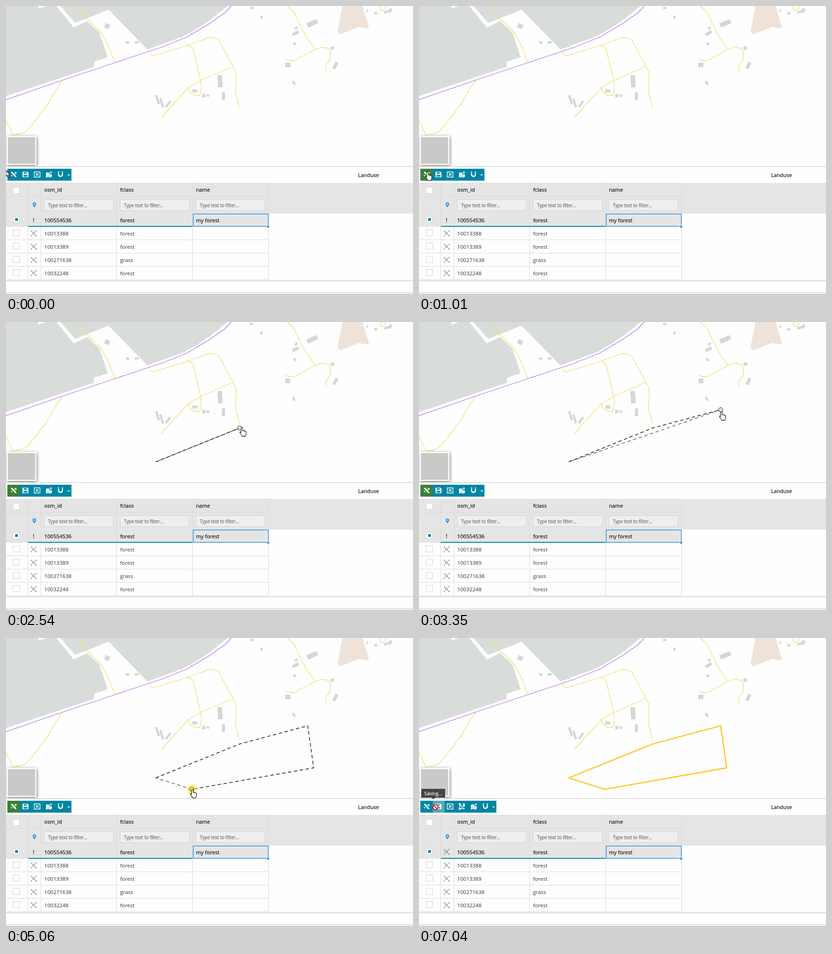
An HTML page for the animation above (8000 ms loop, 889 by 630 pixels).

```html
<!DOCTYPE html>
<html lang="en">
<head>
<meta charset="utf-8">
<title>Add a shape</title>
<style>
  html, body { margin: 0; width: 100%; height: 100%; overflow: hidden; background: #fefefe; }
  svg { display: block; width: 889px; height: 630px; }
  text { font: 11.6px "Open Sans", "Noto Sans", sans-serif; fill: #333; }
  .medium { fill: #222; stroke: #222; stroke-width: .3; }
  .filter { font-size: 9.9px; fill: #777; stroke: #777; stroke-width: .3; }
  .tip text { font-size: 10.2px; fill: #fff; stroke: #fff; stroke-width: .2; text-anchor: middle; }
  .tip { fill: #444; }
  .road { fill: none; stroke: #ecdf70; stroke-width: 1.3; }
  .houses { fill: none; stroke: #d5d7d7; }
  .line { fill: none; stroke: #fff; stroke-width: 1.5; }
  .pointer { fill: #fff; stroke: #000; stroke-width: 1.1; stroke-linejoin: round; }
</style>
</head>
<body>
<svg viewBox="0 0 889 630">
  <defs>
    <filter id="shadow" x="-30%" y="-30%" width="160%" height="160%">
      <feDropShadow dx="1" dy="2" stdDeviation="3.5" flood-opacity=".6"/>
    </filter>
    <g id="zoom" fill="none" stroke="#555">
      <path d="M-5.5-3.5v-2h2M3.500-5.500h2v2M5.500 3.500v2h-2M-3.500 5.500h-2v-2M1 1L4 4"/>
      <circle cx="-.7" cy="-.7" r="2.300"/>
    </g>
  </defs>

  <!-- map -->
  <g fill="#d8ddd9">
    <path d="M0 0H70L71 6 87 0H110L148 47 177 33 204 58 222 112 192 122V133L0 197z"/>
    <path d="M119 0L151 37 224 8 309 95 386 67 420 48 449 28 484 0z"/>
  </g>
  <path fill="#efe3d9" d="M735 0H779L793 47 790 49 771 46 730 62 724 56z"/>
  <g class="houses">
    <path stroke-width="5" d="M328 195l6 20M337 202l6 20M349 221l10-13M626 164l5 8M262 79l7 2M281 80l9-1M533 4.500h7M558 21v6M631 50l6-4M628 80l5 5M787 10h4M804 16h7M826 15l9-4M438 196h6"/>
    <path stroke-width="7" d="M407 186h11M432 192v8M475 189v17M626 63l13-7M709 93l8-2M716 137l7-14M836 14l6-8"/>
    <path stroke-width="10" d="M216 41.500l10 5M467 151v13M468 164v14M610 129h11M658 43l22-10"/>
  </g>
  <g class="road">
    <path d="M156 0L176 27 207 57 223 86 238 124M124 162L109 183 92 214 67 247 44 275 30 280 15 282 0 250"/>
    <path d="M313 99L316 107 322 109 396 86 447 68 464 73 496 132 502 144 503 165 501 188 510 222"/>
    <path d="M396 86L404 88 409 95 425 163 427 179 423 196 410 195 401 188 399 178"/>
    <path d="M496 132L425 163 399 178 354 227 340 244M614 0L628 12 653 63 675 95"/>
    <path d="M610 115L617 119 629 120 675 95 691 90 705 93 709 101 708 118 699 128 698 135 701 143"/>
    <circle cx="823" cy="4" r="6"/>
  </g>
  <path fill="none" stroke="#b06ef0" stroke-width="1.300" d="M0 205L124 162 238 124 313 99 340 90 395 68 445 38 478 15 492 0"/>
  <rect x="3" y="285.500" width="62" height="61" fill="#c9c9c7" stroke="#fff" stroke-width="2.500" filter="url(#shadow)"/>
  <path id="finished" fill="none" stroke="#ffc931" stroke-width="2.800" stroke-linejoin="round"/>
  <g id="sketch" fill="none" stroke-width="1.700" stroke-dasharray="7.6 5.4">
    <path id="closing" stroke="#777"/>
    <path id="edges" stroke="#333"/>
  </g>

  <!-- table -->
  <path fill="#fefefe" d="M0 351H889V630H0z"/>
  <path stroke="#d6d6d6" stroke-width="1.500" d="M0 351H889"/>
  <path fill="#e5e5e5" d="M0 387H889V454H573V483H0z"/>
  <path fill="none" stroke="#d9d9d9" d="M0 387.500H573M0 416.500H573M47.500 387V600M76.500 387V600M241.500 387V600M407.500 387V600M573.500 387V600"/>
  <g id="cells"></g>
  <path fill="#3d9ad6" d="M62 441C60 437 58 436 58 433.500a4 4 0 0 1 8 0C66 436 64 437 62 441z"/>
  <circle cx="62" cy="433.500" r="1.400" fill="#e5e5e5"/>
  <path stroke="#0086a3" stroke-width="2" d="M48 482H407"/>
  <rect x="409" y="455" width="164" height="27" fill="none" stroke="#5aa7e3" stroke-width="2"/>
  <rect x="569.500" y="479.500" width="6" height="6" fill="#4a9fe0" stroke="#fff"/>
  <rect x="20" y="464" width="6" height="6" fill="#0086a3"/>
  <text id="unsaved" x="58.500" y="473" style="font-size:13px;font-weight:600">!</text>
  <use id="saved" href="#zoom" x="60.500" y="468"/>
  <path stroke="#cfcfcf" stroke-width="1.500" d="M0 601H889M0 627.500H889"/>

  <!-- toolbar -->
  <text x="769" y="373.500" class="medium">Landuse</text>
  <rect id="bar" x="3" y="356" height="26" fill="#0086a3"/>
  <rect id="addButton" x="3" y="356" width="27" height="26"/>
  <rect id="saveButton" x="30" y="356" width="26" height="26"/>
  <g fill="#fff">
    <g transform="translate(17 368.500)">
      <path d="M-6.500-4.500L-4-6.500 4.500 2.500 6 6.500 2 5z"/>
      <path class="line" d="M4-6v5.500M1.200-3.200h5.600M-6 1l2.500 3"/>
    </g>
    <path transform="translate(42.500 368.500)" fill-rule="evenodd" d="M-6.500-6H4.500L6.500-4V6H-6.500zM-3.500-4.800V-1.500H3V-4.800zM-4.300 1V4.700H4.300V1z"/>
    <path class="line" transform="translate(68 368.500)" d="M-6.300-5.800H6.300V5.800H-6.300zM-3-3L3 3M3-3L-3 3"/>
    <g id="reshape" transform="translate(94 368.500)">
      <path class="line" d="M-5-5V5H6M-5-5L3 5"/>
      <path d="M-7-7h4v4h-4zM-7 3h4v4h-4zM1-5h1.200v-1.500h1.300V-7h1.300v1h1.400v5l-2 2.500H3L1-2z"/>
    </g>
    <g id="tail">
      <path transform="translate(94 369)" d="M-6.500-4L-2.500-5.500V5L-6.500 6.500zM-1.800-5.500L1.500-3V6.500L-1.800 5zM2.200-2L4 0 6-2V5L2.200 6.500zM1.500-6.500h5L4-2z"/>
      <path class="line" style="stroke-width:2.600" transform="translate(119 368)" d="M-4.200-6V.5a4.200 4.200 0 0 0 8.400 0V-6"/>
      <path stroke="#0086a3" d="M113 365h12"/>
      <path d="M134 368.500h6l-3 3z"/>
    </g>
  </g>

  <!-- tooltips and pointers -->
  <g class="tip" id="addTip">
    <path d="M0 316H163V349H21L17 353 13 349H0z"/>
    <text x="80" y="330">Add a shape to the existing</text>
    <text x="80" y="344">geometry</text>
  </g>
  <g class="tip" id="saveTip">
    <path d="M5 330H81V349H47L43 353 39 349H5z"/>
    <text x="43" y="343.500">Save changes</text>
  </g>
  <g class="tip" id="savingTip">
    <path d="M5 330H57V349H35L31 353 27 349H5z"/>
    <text x="31" y="343.500">Saving...</text>
  </g>
  <circle id="halo" r="10" fill="#fff029" fill-opacity=".8"/>
  <circle id="vertex" r="4.500" fill="#fff" fill-opacity=".5" stroke="#333" stroke-width="1.200"/>
  <g id="pointer">
    <path id="arrow" class="pointer" d="M0 0V13L3 10.200 5 15 7.300 14 5.300 9.300H9.300z"/>
    <path id="hand" class="pointer" transform="translate(1 0)" d="M-1.700 11V1.200a1.700 1.700 0 0 1 3.400 0V7a1.600 1.600 0 0 1 2.800.6 1.600 1.600 0 0 1 2.500.6 1.500 1.500 0 0 1 2.300 1.200V13c0 2.500-1.700 3.500-1.700 6H.4C.2 16.500-3 14-4.200 11.200c-.5-1.700 1-2.400 2.500-.2z"/>
    <path id="resize" d="M-6-1H7V.5H-6zM-6 2.500H7V4H-6zM0-1V-3H-2.500L.5-6.500 3.500-3H1V-1zM0 4V6H-2.500L.5 9.500 3.500 6H1V4z"/>
    <g id="blocked" fill="#fff" stroke="#c4161c" stroke-width="2"><circle r="5.500"/><path d="M-4-4L4 4"/></g>
  </g>
</svg>

<script>
const LOOP = 8000, STEP = 70, LAG = 45;
const HOVER_ADD = 203, ADD_MODE = 600, LEAVE_ADD = 1010, FINISH = 5310, HOVER_SAVE = 6390, SAVING = 7040;
const TEAL = '#0086a3', DARK_TEAL = '#003d4b';
const $ = id => document.getElementById(id);
const show = (id, on) => { $(id).style.display = on ? '' : 'none'; };
const place = (id, [x, y]) => $(id).setAttribute('transform', `translate(${x} ${y})`);
const outline = points => 'M' + points.join('L');

const label = (x, y, text, type = '') => `<text x="${x}" y="${y}" class="${type}">${text}</text>`;
const box = (x, y, w, h, fill) => `<rect x="${x}" y="${y}" width="${w}" height="${h}" fill="${fill}" stroke="#d2d2d2"/>`;
const columnX = i => 83.5 + 165.7 * i;

function tableCells() {
  const rows = ['100554536 forest', '10013388 forest', '10013389 forest', '100271638 grass', '10032248 forest'];
  let svg = box(15.5, 396.5, 14, 13.5, '#fff') + label(columnX(2), 472.5, 'my forest', 'medium');
  ['osm_id', 'fclass', 'name'].forEach((name, i) => {
    const x = columnX(i);
    svg += label(x, 406, name, 'medium') + box(Math.floor(x) + .5, 423.5, 151, 24, '#efefef')
      + label(x + 8.5, 440, 'Type text to filter...', 'filter');
  });
  rows.forEach((row, r) => {
    const y = 468 + 29 * r;
    svg += box(15.5, y - 7.5, 14, 13.5, '#fff');
    if (r) svg += `<use href="#zoom" x="60.5" y="${y + .5}"/><path stroke="#d9d9d9" d="M0 ${y + 14.5}H573"/>`;
    row.split(' ').forEach((text, i) => { svg += label(columnX(i), y + 4.5, text, r ? '' : 'medium'); });
  });
  return svg;
}
$('cells').innerHTML = tableCells();

// Corners of the drawn shape, in the order they are clicked
const shape = [[327, 306], [510, 232], [659, 192], [672, 284], [406, 331]];
$('finished').setAttribute('d', outline(shape) + 'z');

const moves = [
  { start: 70, end: 270, to: [17, 363] },
  { start: 930, end: 1410, to: shape[0] },
  { start: 1610, end: 2140, to: shape[1], corner: shape[0] },
  { start: 2410, end: 3090, to: shape[2], corner: shape[1] },
  { start: 3230, end: 3700, to: shape[3], corner: shape[2] },
  { start: 3900, end: 4650, to: [424, 326], corner: shape[3], bow: 9 },
  { start: 4710, end: 4920, to: shape[4] },
  { start: 5990, end: 6180, to: [127, 352] },
  { start: 6180, end: HOVER_SAVE, to: [36, 370] }
];
const cornerMoves = moves.filter(move => move.corner);
const clicks = [460, 5060, 5225, 6910, ...cornerMoves.map(move => move.start)];

function pointerAt(t) {
  let [x, y] = [0, 360];
  for (const { start, end, to, bow = 0 } of moves) {
    const p = Math.max(0, Math.min(1, (t - start - STEP) / (end - start - STEP)));
    const ease = p * p * (3 - 2 * p);
    x += (to[0] - x) * ease;
    y += (to[1] - y) * ease + bow * 4 * ease * (1 - ease);
  }
  return [x, y];
}

function draw(t) {
  const pointer = pointerAt(t), vertex = pointerAt(t - LAG);
  const adding = t >= ADD_MODE && t < FINISH, finished = t >= FINISH;
  const hoverAdd = t >= HOVER_ADD && t < LEAVE_ADD;
  const hoverSave = t >= HOVER_SAVE && t < SAVING, saving = t >= SAVING;

  const placed = cornerMoves.filter(move => t >= move.start).map(move => move.corner);
  show('sketch', adding && placed.length);
  show('closing', placed.length > 1);
  if (placed.length) {
    $('edges').setAttribute('d', outline([...placed, vertex]));
    $('closing').setAttribute('d', outline([vertex, placed[0]]));
  }
  show('vertex', adding && vertex[1] < 345);
  place('vertex', vertex);

  show('unsaved', !finished);
  for (const id of ['finished', 'saved', 'reshape']) show(id, finished);
  place('tail', [finished ? 26 : 0, 0]);
  $('bar').setAttribute('width', finished ? 166 : 140);
  $('addButton').setAttribute('fill', adding ? '#3b8039' : hoverAdd ? DARK_TEAL : TEAL);
  $('saveButton').setAttribute('fill', saving ? '#55aabd' : hoverSave ? DARK_TEAL : TEAL);

  show('addTip', hoverAdd);
  show('saveTip', hoverSave);
  show('savingTip', saving);
  show('halo', clicks.some(time => t >= time && t < time + STEP));
  place('halo', pointer);
  place('pointer', pointer);
  const onDivider = t >= 6180 && t < 6250;
  const cursor = t < HOVER_ADD ? 'arrow' : saving ? 'blocked' : onDivider ? 'resize' : 'hand';
  for (const id of ['arrow', 'hand', 'resize', 'blocked']) show(id, id === cursor);
}

const begin = performance.now();
function tick() {
  draw((performance.now() - begin) % LOOP);
  requestAnimationFrame(tick);
}
tick();
</script>
</body>
</html>
```
